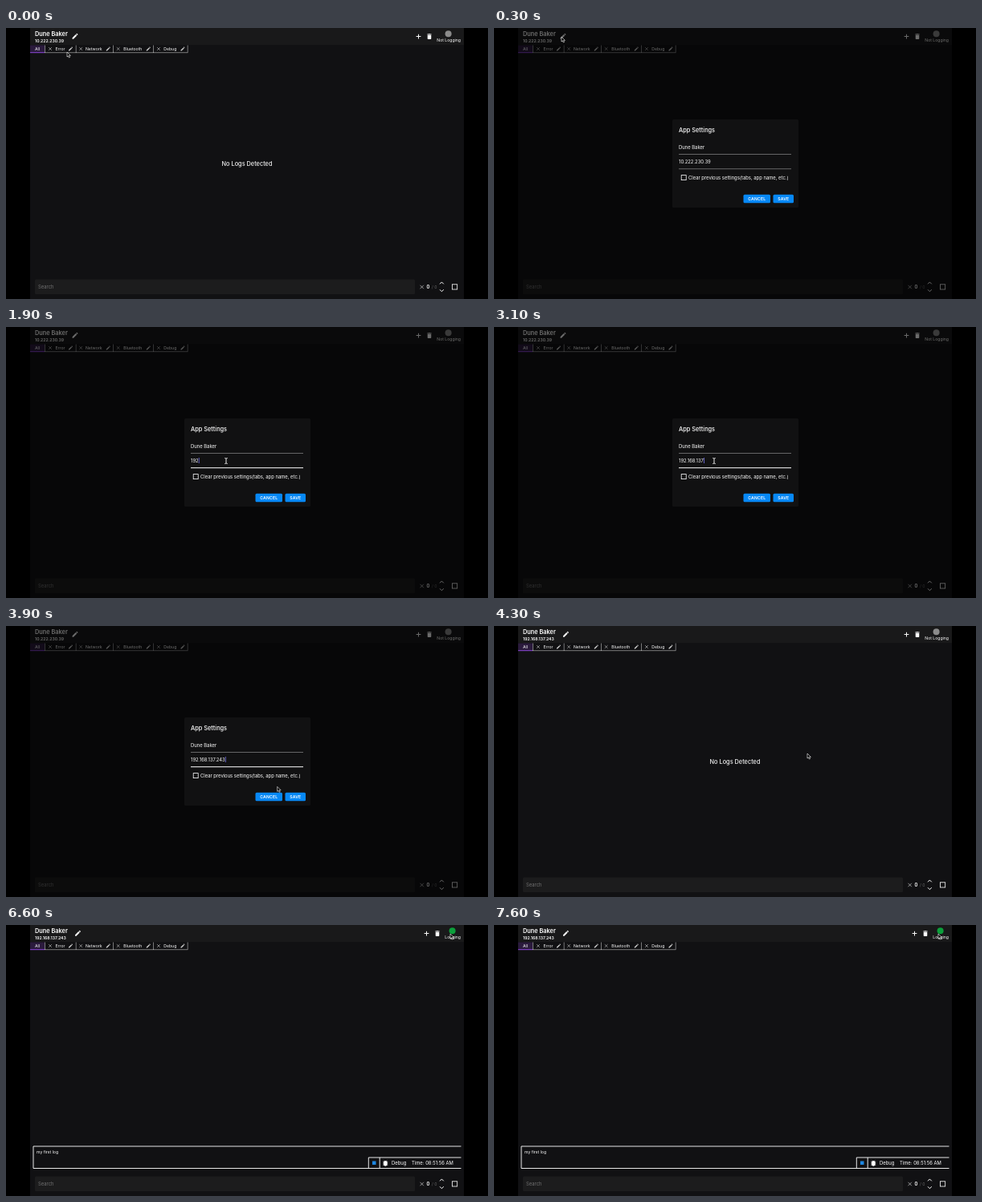
These frames come from a looping animation (600 px wide and 338 px high, 8000 ms). An HTML page:

```html
<!DOCTYPE html>
<html lang="en">
<head>
<meta charset="utf-8">
<title>Log viewer</title>
<style>
  html, body { margin: 0; width: 100%; height: 100%; overflow: hidden; background: #000; }
  svg { display: block; width: 600px; height: 338px; font: 5.88px Inter, "Liberation Sans", sans-serif; fill: #fff; }
  text { white-space: pre; }
  .s { font-size: 5.14px; }
  .l { font-size: 7.35px; font-weight: 500; }
  .b { font-weight: 600; }
  .btn { font-size: 5.14px; font-weight: 600; letter-spacing: .028em; }
  .line { fill: none; stroke: #fff; }
</style>
</head>
<body>
<svg viewBox="0 0 600 338">
  <defs>
    <path id="edit" d="M-9 5.3V9h3.7L5.8-2 2-5.8zM8.7-5a1 1 0 0 0 0-1.4L6.4-8.7a1 1 0 0 0-1.4 0L3.1-6.9 6.9-3.1z"/>
    <path id="add" d="M7 1.2H1.2V7h-2.4V1.2H-7v-2.4h5.8V-7h2.4v5.8H7z"/>
    <path id="bin" d="M-6 7q0 2 2 2h8q2 0 2-2V-5H-6zM7-8H3.5l-1-1h-5l-1 1H-7v2H7z"/>
    <path id="close" d="M-6.3-6.3 6.3 6.3M6.3-6.3-6.3 6.3" stroke="#ccc" stroke-width="2"/>
    <path id="bug" d="M-8-4H8M-8 1H8M-8 6H8M-5-9-2-6M5-9 2-6M-5-2a5 5 0 0 1 10 0v6a5 5 0 0 1-10 0z" stroke="#fff" stroke-width="2"/>
  </defs>

  <rect x="30" width="540" height="338" fill="#111113"/>
  <rect x="30" width="540" height="21" fill="#19191a"/>
  <text class="l b" x="36" y="10">Dune Baker</text>
  <text class="s b" id="ip" x="36" y="17.6"></text>
  <use href="#edit" id="pen"/>
  <use href="#add" id="plus"/>
  <use href="#bin" id="trash"/>
  <circle id="dot" cy="7.3" r="4"/>
  <text class="s" id="status" x="566" y="17.3" text-anchor="end"></text>
  <path id="spin" d="M559 3.6A6.4 6.4 0 0 0 552.6 10" fill="none" stroke="#1594f5" stroke-width="1.5"/>

  <g id="tabs">
    <rect x="30" y="21.5" width="18" height="9.5" fill="#2b1b3d"/>
    <text class="s" x="36" y="28">All</text>
    <path d="M30 30.7H48" stroke="#8a46d8"/>
    <path class="line" d="M48.5 31V21.5M48 30.7H226.200V21.5M87.200 21.500V31M133.500 21.500V31M183.500 21.500V31" stroke-opacity=".55" stroke-width=".8"/>
  </g>

  <text id="empty" class="l" x="300" y="172" text-anchor="middle" fill="#eee">No Logs Detected</text>

  <g id="log">
    <path class="line" d="M566.500 276H34V303.500H566.500M451.300 303.500V290H566.500M465.200 290V303.500" stroke-width=".9"/>
    <text class="s" x="38" y="285">my first log</text>
    <rect x="456" y="294.500" width="4.500" height="4.500" fill="#1d86e0"/>
    <use href="#bug" transform="translate(472.300 297)scale(.37)"/>
    <text x="480" y="299">Debug</text>
    <text x="505" y="299">Time: 08:51:56 AM</text>
  </g>

  <rect x="36" y="313.500" width="473" height="18.500" rx="1.500" fill="#1c1c1d"/>
  <text x="40" y="325" fill="#737373">Search</text>
  <use href="#close" transform="translate(517.700 323)scale(.35)"/>
  <text class="b" x="523.500" y="325.200">0</text>
  <text class="s" x="530" y="325" fill="#666">/ 0</text>
  <path class="line" d="M540 319.300l2.400-2.400 2.400 2.400M540 326.300l2.400 2.400 2.400-2.400"/>
  <rect class="line" x="555.500" y="319.800" width="6.200" height="6.200" stroke="#aaa" stroke-width=".8"/>

  <g id="modal">
    <rect width="600" height="338" fill-opacity=".58" fill="#000"/>
    <rect x="222" y="114" width="157" height="110" rx="1.500" fill="#111112"/>
    <text class="l" x="230" y="130">App Settings</text>
    <text x="230" y="150.700">Dune Baker</text>
    <path class="line" d="M230 157.500H370" stroke-opacity=".6" stroke-width=".6"/>
    <rect id="mark" x="230" y="162" height="7.500" fill="#315c96"/>
    <text id="field" x="230" y="168.700"></text>
    <path id="under" class="line" d="M230 175.700H370"/>
    <path id="caret" d="M0 163V170" stroke="#7a78f5" stroke-width=".8"/>
    <rect class="line" x="233.200" y="183.600" width="6" height="6" stroke="#bbb" stroke-width=".8"/>
    <text x="242" y="188.700">Clear previous settings(tabs, app name, etc.)</text>
    <g fill="#0788f5">
      <rect x="310.500" y="207.700" width="33.500" height="10.500" rx="1.500"/>
      <rect x="347.500" y="207.700" width="25.500" height="10.500" rx="1.500"/>
    </g>
    <text class="btn" x="327.300" y="214.900" text-anchor="middle">CANCEL</text>
    <text class="btn" x="360.300" y="214.900" text-anchor="middle">SAVE</text>
  </g>

  <path id="arrow" d="M0 0V6l1.400-1.200 1 2.200 1.100-.5-1-2.100H4.400z" fill="#000" stroke="#fff" stroke-width=".6"/>
  <path id="beam" class="line" d="M-1.700-3.500Q0-3.500 0-2.500Q0-3.500 1.700-3.500M0-2.500V2.500M-1.700 3.500Q0 3.500 0 2.500Q0 3.500 1.700 3.500" stroke-width=".9"/>
</svg>
<script>
const $ = id => document.getElementById(id);
const OLD = '10.222.230.39', NEW = '192.168.137.243';
const clamp = v => Math.max(0, Math.min(1, v));
const show = (id, on) => $(id).style.display = on ? '' : 'none';
const place = (id, x, y, k = 1) => $(id).setAttribute('transform', `translate(${x} ${y})scale(${k})`);
const set = (id, attrs) => { for (const k in attrs) $(id).setAttribute(k, attrs[k]); };

// [label, x of close icon, x of label, x of pencil]
const tabs = [['Error', 55, 61.5, 80.5], ['Network', 93.2, 99, 127.3],
              ['Bluetooth', 139.7, 146.3, 177.3], ['Debug', 190, 196.3, 220]];
$('tabs').innerHTML += tabs.map(([label, x, tx, px]) =>
  `<use href="#close" transform="translate(${x} 26)scale(.3)"/>
   <text class="s" x="${tx}" y="28">${label}</text>
   <use href="#edit" transform="translate(${px} 26)scale(.28)" fill="#ccc"/>`).join('');

// pointer path: [time, x, y]
const path = [[0, 76, 30], [100, 76, 30], [200, 84, 11], [400, 84, 11], [900, 274, 167], [3700, 274, 167],
              [4000, 360, 212], [4100, 360, 212], [4300, 390, 159], [4700, 552, 10], [5100, 552, 10],
              [5600, 553, 11], [8000, 553, 11]];
function pointer(t) {
  const i = path.findIndex(p => p[0] > t), [t0, x0, y0] = path[i - 1], [t1, x1, y1] = path[i];
  const k = (t - t0) / (t1 - t0), e = k * k * (3 - 2 * k);
  return [x0 + (x1 - x0) * e, y0 + (y1 - y0) * e];
}

function draw(t) {
  const saved = t >= 4200, loading = t >= 4900 && t < 5200, logging = t >= 5200, logged = t >= 6600;

  $('ip').textContent = saved ? NEW : OLD;
  place('pen', saved ? 89.5 : 86, 10.3, .38);
  const shift = loading ? 17 : logging ? 10 : 0;
  place('plus', 513.5 + shift, 10.6, .41);
  place('trash', 527 + shift, 10.6, .38);
  show('dot', !loading);
  set('dot', { cx: logging ? 555.6 : 550.6, fill: logging ? '#0c9f3b' : '#8b8b8b' });
  $('status').textContent = loading ? '' : logging ? 'Logging' : 'Not Logging';
  show('spin', loading);
  set('spin', { transform: `rotate(${(t - 5100) * .26} 559 10)` });
  show('empty', !logged);
  show('log', logged);

  // settings dialog: fades, then the address is selected, cleared and typed
  set('modal', { opacity: t < 4000 ? clamp((t - 100) / 200) : clamp((4300 - t) / 200) });
  const typed = Math.max(0, Math.floor((t - 1450) / 150));
  $('field').textContent = t < 1500 ? OLD : NEW.slice(0, typed);
  const w = $('field').textContent ? $('field').getComputedTextLength() : 0;
  const focus = t >= 1000, marked = t >= 1200 && t < 1500;
  show('mark', marked);
  set('mark', { width: w });
  set('under', focus ? { stroke: '#1e90f0', 'stroke-opacity': 1, 'stroke-width': 1 }
                     : { stroke: '#fff', 'stroke-opacity': .6, 'stroke-width': .6 });
  show('caret', focus && !marked);
  place('caret', 230.6 + w, 0);

  const [x, y] = pointer(t), beam = t >= 900 && t <= 3700;
  show('beam', beam);
  show('arrow', !beam);
  place(beam ? 'beam' : 'arrow', x, y);
}

const start = performance.now();
function tick() {
  const t = (performance.now() - start) % 8000;
  draw(Math.floor(t / 100) * 100);
  requestAnimationFrame(tick);
}
tick();
</script>
</body>
</html>
```
